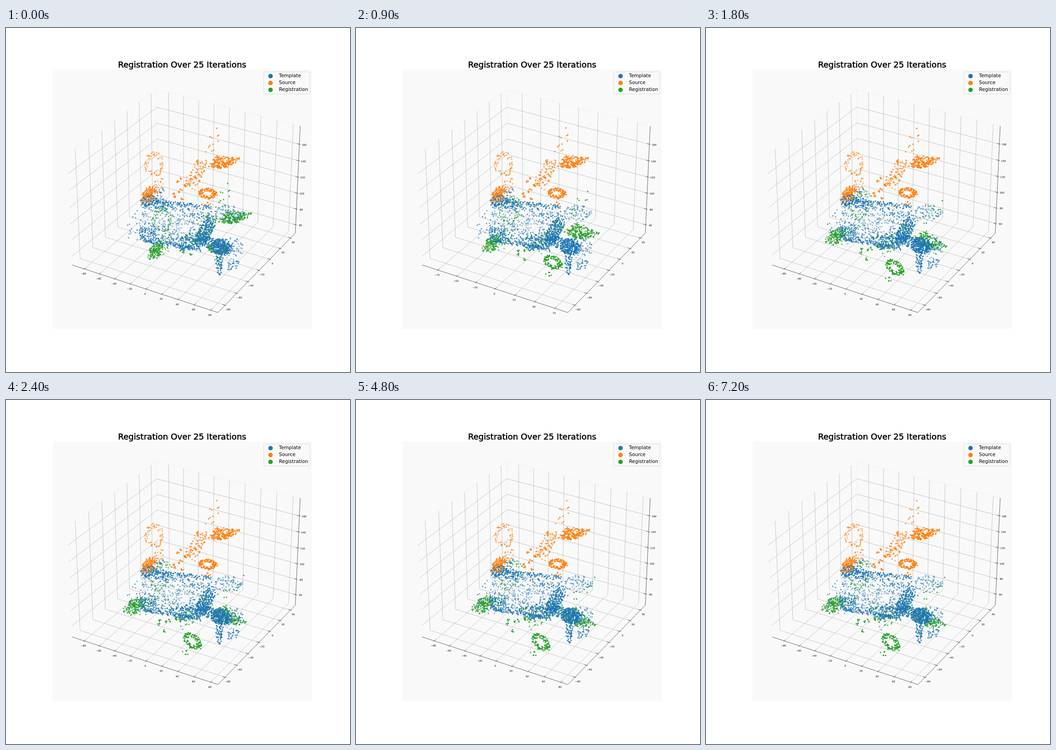
Recreate the animation shown at these times as an HTML page with a canvas. Size 748 by 748 pixels, loop 7.5 s.

```html
<!DOCTYPE html>
<html lang="en">
<head>
<meta charset="utf-8">
<title>Registration Over 25 Iterations</title>
<style>
  html, body { margin: 0; width: 100%; height: 100%; overflow: hidden; background: #fff; }
  canvas, svg { position: absolute; left: 0; top: 0; width: 748px; height: 748px; }
  text { font-family: "DejaVu Sans", sans-serif; }
</style>
</head>
<body>
<canvas id="plot" width="748" height="748"></canvas>
<svg viewBox="0 0 748 748">
  <text x="383" y="86" font-size="18.1" text-anchor="middle" stroke="#000" stroke-width=".55">Registration Over 25 Iterations</text>
  <rect x="560.5" y="95.5" width="100.5" height="48" rx="2" fill="#f9f9f9" stroke="#ccc" stroke-opacity=".8" stroke-width=".8"/>
  <g font-size="10.5">
    <circle cx="575.2" cy="104.6" r="4.9" fill="#1f77b4"/><text x="593.5" y="107.4">Template</text>
    <circle cx="575.2" cy="119.6" r="4.9" fill="#ff7f0e"/><text x="593.5" y="122.4">Source</text>
    <circle cx="575.2" cy="134.6" r="4.9" fill="#2ca02c"/><text x="593.5" y="137.4">Registration</text>
  </g>
</svg>
<script>
const ctx = document.getElementById('plot').getContext('2d');
const STEP = 300, COUNT = 25;
const BLUE = '#1f77b4', ORANGE = '#ff7f0e', GREEN = '#2ca02c';
const mix = (a, b, t) => a + (b - a) * t;

// ---- convergence, and the axis limits that follow it
const progress = n => n < 1 ? 0 : 1 - Math.exp(-Math.pow((n - 1) / 3.5, 1.3));
const widen = n => n < 1 ? 0 : Math.max(0, 1 - 1.42 * progress(n));
const deepen = n => Math.max(0, (progress(n) - .65) / .35);
const X_MIN = -92.3, Y_MIN = -89.2, Y_MAX = 46.8, Z_MAX = 179.1;
const xMax = n => 84.9 + 4.5 * widen(n);
const zMin = n => 51.9 - 3.9 * deepen(n);

// ---- perspective view: elevation 30, azimuth -60, distance 10
const HX = .57144, HZ = .42857;                     // data half sizes
const EX = HX * 25 / 24, EZ = HZ * 25 / 24;         // padded box
function project(x, y, z) {
  const d = 10 - (.43301 * x - .75 * y + .5 * z);
  return [
    391 + 3048.6 * (.86603 * x + .5 * y) / d,
    364.7 - 3048.6 * (-.25 * x + .43301 * y + .86603 * z) / d
  ];
}
const scale = (lo, hi, half) => v => ((v - lo) / (hi - lo) * 2 - 1) * half;

function line(color, width, ...pts) {
  ctx.strokeStyle = color;
  ctx.lineWidth = width;
  ctx.beginPath();
  pts.forEach(p => ctx.lineTo(...project(...p)));
  ctx.stroke();
}
const edge = (...pts) => line('#eee', .7, ...pts);
const grid = (...pts) => line('#b0b0b0', .7, ...pts);
const mark = (...pts) => line('#000', .6, ...pts);

function label(v, p, dx, dy) {
  const [x, y] = project(...p);
  ctx.fillText(String(v).replace('-', '\u2212'), x + dx, y + dy);
}

function ticks(from, to, step, draw) {
  for (let v = from; v <= to; v += step) draw(v);
}

function drawAxes(n) {
  const bx = scale(X_MIN, xMax(n), HX);
  const by = scale(Y_MIN, Y_MAX, HX);
  const bz = scale(zMin(n), Z_MAX, HZ);
  const coarse = xMax(n) > 86.5;
  const tickIn = .019, tickOut = .0095;

  ctx.fillStyle = '#000';
  ctx.font = '5.4px "DejaVu Sans", sans-serif';
  ctx.textAlign = 'center';
  ctx.textBaseline = 'middle';

  edge([-EX, -EX, EZ], [-EX, EX, EZ], [EX, EX, EZ]);
  edge([-EX, EX, -EZ], [-EX, EX, EZ]);
  mark([-EX, -EX, -EZ], [EX, -EX, -EZ], [EX, EX, -EZ], [EX, EX, EZ]);

  ticks(coarse ? -75 : -80, 80, coarse ? 25 : 20, v => {
    const x = bx(v);
    grid([x, -EX, -EZ], [x, EX, -EZ], [x, EX, EZ]);
    mark([x, -EX + tickIn, -EZ], [x, -EX - tickOut, -EZ]);
    label(v, [x, -EX, -EZ], -1.8, 11);
  });
  ticks(-80, 40, 20, v => {
    const y = by(v);
    grid([EX, y, -EZ], [-EX, y, -EZ], [-EX, y, EZ]);
    mark([EX - tickIn, y, -EZ], [EX + tickOut, y, -EZ]);
    label(v, [EX, y, -EZ], 6, 9.4);
  });
  ticks(60, 160, 20, v => {
    const z = bz(v);
    grid([-EX, -EX, z], [-EX, EX, z], [EX, EX, z]);
    mark([EX - tickIn, EX, z], [EX + tickOut, EX, z]);
    label(v, [EX, EX, z], 10.4, 1.4);
  });
}

// ---- seeded point clouds
let seed = 20417;
function rand() {
  seed = (seed + 0x6D2B79F5) | 0;
  let t = Math.imul(seed ^ seed >>> 15, 1 | seed);
  t = t + Math.imul(t ^ t >>> 7, 61 | t) ^ t;
  return ((t ^ t >>> 14) >>> 0) / 4294967296;
}
const jitter = size => (rand() - .5) * size;
const many = (count, make) => Array.from({ length: count }, (_, i) => make(i));
const point = (x, y, alpha) => ({ x, y, alpha: Math.min(1, alpha + jitter(.22)) });

// Tilted ellipse; inner > 0 leaves a hole, power > .5 packs the middle.
function oval(count, cx, cy, rx, ry, tilt, alpha, { inner = 0, power = .6 } = {}) {
  const c = Math.cos(tilt), s = Math.sin(tilt);
  return many(count, () => {
    const a = rand() * Math.PI * 2, r = mix(inner, 1, Math.pow(rand(), power));
    const x = rx * r * Math.cos(a), y = ry * r * Math.sin(a);
    return point(cx + x * c - y * s, cy + x * s + y * c, alpha);
  });
}

// Four-cornered patch, corners clockwise from top left; rim pulls points to top and bottom.
function patch(count, [a, b, c, d], alpha, rim = 0) {
  return many(count, () => {
    const u = rand(), r = rand();
    const v = mix(r, .5 - .5 * Math.cos(Math.PI * r), rim);
    const at = k => mix(mix(a[k], b[k], u), mix(d[k], c[k], u), v);
    return point(at(0) + jitter(5), at(1) + jitter(5), mix(alpha, mix(.5, .9, Math.abs(2 * v - 1)), rim));
  });
}

// Tight little groups scattered over an oval.
const groups = (count, size, ...area) =>
  oval(count, ...area).flatMap(p => many(size, () => point(p.x + jitter(5), p.y + jitter(4), p.alpha)));

const template = [
  ...patch(620, [[299, 372], [448, 388], [424, 484], [291, 462]], .7, 1),
  ...oval(80, 484, 404, 32, 19, 0, .55),
  ...oval(75, 491, 480, 26, 25, .3, .58),
  ...oval(100, 321, 378, 30, 15, .1, .78),
  ...oval(28, 283, 440, 22, 58, .3, .7),
  ...oval(14, 336, 358, 13, 13, 0, .65),
  ...oval(55, 309, 444, 20, 19, 0, .82),
  ...oval(125, 403, 464, 38, 18, -.35, .92),
  ...oval(190, 433, 442, 37, 15, -1.05, .95),
  ...oval(85, 438, 466, 27, 12, .2, .98),
  ...oval(250, 468, 476, 23, 18, .1, .98),
  ...oval(65, 464, 503, 8, 34, 0, 1),
  ...oval(24, 491, 516, 19, 11, -.6, .85)
];

const source = [
  ...patch(205, [[457, 278], [517, 282], [478, 304], [444, 304]], .92),
  ...patch(105, [[416, 284], [446, 292], [410, 352], [388, 338]], .78),
  ...groups(9, 4, 375, 350, 20, 24, 0, .95),
  ...oval(130, 439, 360, 21, 12, .15, 1, { inner: .4 }),
  ...oval(7, 440, 381, 11, 6, .1, 1),
  ...oval(165, 309, 364, 22, 13, -1.05, .85),
  ...oval(70, 322, 296, 21, 28, 0, .65, { inner: .55 }).map(p => ({ ...p, y: Math.max(p.y, 270 + jitter(2)) })),
  ...oval(12, 449, 246, 14, 32, .4, .95),
  ...oval(34, 331, 348, 14, 24, .4, .7)
];

// ---- registration: an affine map carried by three anchor points
const HOME = [[310, 364], [322, 294], [439, 360]];
const RAISED = [[326, 485], [339, 415], [461, 480]];
const FIRST = [[308, 484], [335, 404], [445, 499]];
const SETTLED = [[277, 446], [337, 378], [402, 527]];

function weights(p) {
  const [[ox, oy], [ax, ay], [bx, by]] = HOME;
  const ux = ax - ox, uy = ay - oy, vx = bx - ox, vy = by - oy;
  const x = p.x - ox, y = p.y - oy, det = ux * vy - uy * vx;
  const s = (x * vy - y * vx) / det, t = (ux * y - uy * x) / det;
  return { w: [1 - s - t, s, t], alpha: p.alpha };
}
const moving = source.map(weights);

function anchors(n) {
  if (n < 1) return RAISED;
  const q = progress(n);
  return FIRST.map((p, i) => p.map((v, k) => mix(v, SETTLED[i][k], q)));
}

function dot(x, y, alpha) {
  ctx.globalAlpha = alpha;
  ctx.beginPath();
  ctx.arc(x, y, 1.5, 0, Math.PI * 2);
  ctx.fill();
}

// Still points shift only with the axis limits.
function drawStill(points, color, n) {
  const kx = -.0185 * widen(n), kz = -.03 * deepen(n);
  ctx.fillStyle = color;
  for (const { x, y, alpha } of points) {
    const dx = kx * (x - 220);
    dot(x + dx, y + .29 * dx + kz * (y - 250), alpha);
  }
}

function drawMoving(n) {
  const keys = anchors(n);
  const at = (w, k) => w.reduce((sum, wi, i) => sum + wi * keys[i][k], 0);
  ctx.fillStyle = GREEN;
  for (const { w, alpha } of moving) dot(at(w, 0), at(w, 1), alpha);
}

function draw(n) {
  ctx.globalAlpha = 1;
  ctx.fillStyle = '#fff';
  ctx.fillRect(0, 0, 748, 748);
  ctx.fillStyle = '#f9f9f9';
  ctx.fillRect(101, 90, 564.4, 564.4);
  drawAxes(n);
  drawStill(source, ORANGE, n);
  drawMoving(n);
  drawStill(template, BLUE, n);
}

let shown = -1;
const start = performance.now();
function frame() {
  const n = Math.floor(Math.max(0, performance.now() - start) / STEP) % COUNT;
  if (n !== shown) draw(shown = n);
  requestAnimationFrame(frame);
}
frame();
</script>
</body>
</html>
```
